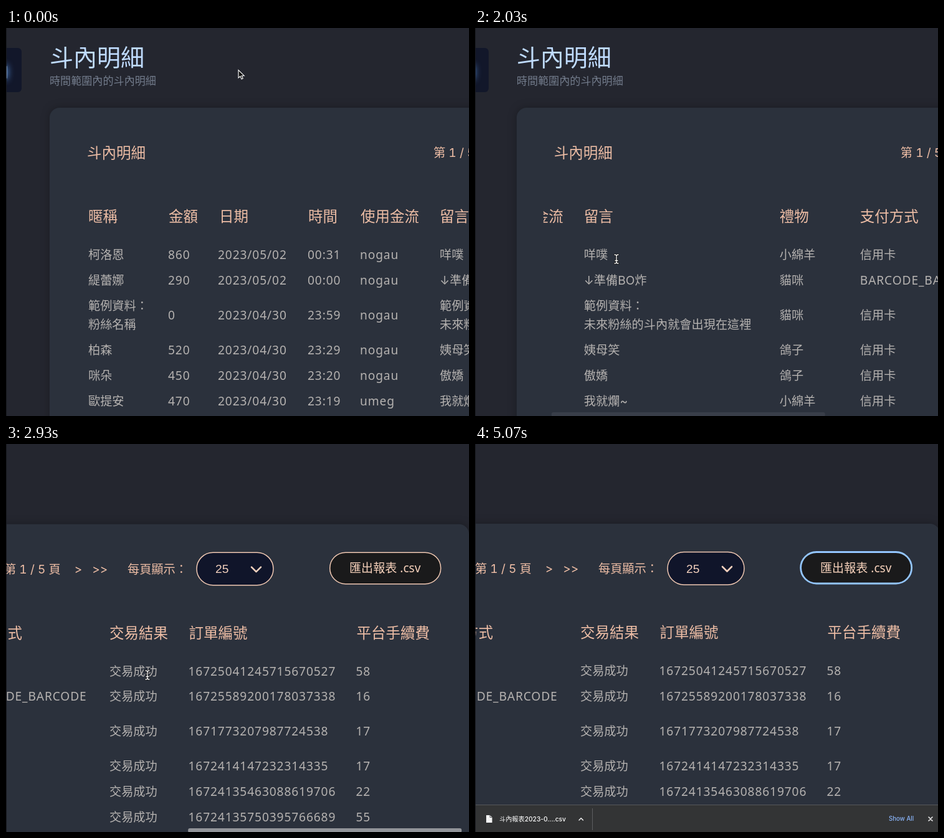
Animation, 743 px wide and 623 px high, one loop 5.23 s. Source, as an HTML page:

```html
<!DOCTYPE html>
<html lang="zh-Hant">
<head>
<meta charset="utf-8">
<title>斗內明細</title>
<style>
  html, body { margin: 0; width: 100%; height: 100%; overflow: hidden; background: #24262f; }
  svg { display: block; width: 743px; height: 623px; }
  text { font-family: Inter, "Noto Sans CJK TC", "Noto Sans CJK", sans-serif; white-space: pre; }
  .peach { fill: #edbda5; font-size: 19.2px; font-variant-numeric: tabular-nums; }
  .head { fill: #edbda5; font-size: 23.5px; }
  .cell { fill: #b5b2b0; font-size: 19.2px; }
  .latin, .label { font-family: "Noto Sans", "Noto Sans CJK TC", "Noto Sans CJK", sans-serif; }
  .latin { letter-spacing: .045em; }
  .label { fill: #f5d0ba; font-size: 19.1px; }
  .card { fill: #2b313c; filter: drop-shadow(0 0 7px #0004); }
  .pill { stroke: #f0c8b2; stroke-width: 1.5; }
  .icon { fill: #bfdbfe; filter: drop-shadow(0 0 6px #60a5fa); }
  .small { fill: #fff; font-size: 10.2px; font-weight: 500; }
  .url { fill: #fff; font-size: 9.6px; font-weight: 500; }
  .line { fill: none; stroke-linecap: round; stroke-linejoin: round; }
</style>
</head>
<body>
<svg viewBox="0 0 743 623">
  <defs>
    <clipPath id="tableClip"><rect x="113" y="270" width="1276" height="400"/></clipPath>
    <clipPath id="urlClip"><rect id="urlBox" y="562" width="247" height="17"/></clipPath>
    <path id="beamShape" d="M-3-7Q0-7 0-5Q0-7 3-7M0-5V5M-3 7Q0 7 0 5Q0 7 3 7M-2 2.5h4"/>
  </defs>
  <rect width="743" height="623" fill="#24262f"/>

  <g id="page">
    <rect x="-10" y="32" width="35" height="71" rx="6" fill="#12172a"/>
    <rect class="icon" x="-8" y="60" width="9.5" height="22" rx="2"/>
    <text x="70" y="61" font-size="38" fill="#bfdbfe">斗內明細</text>
    <text x="70" y="90.5" font-size="17.1" fill="#727b8b">時間範圍內的斗內明細</text>
    <rect class="card" x="70" y="128" width="1362" height="560" rx="16"/>
    <text class="head" x="130" y="208.5">斗內明細</text>
    <g class="peach">
      <text x="686" y="207">第 1 / 5 頁</text>
      <text x="799" y="207">&gt;</text>
      <text x="827.5" y="207">&gt;&gt;</text>
      <text x="884" y="207">每頁顯示：</text>
    </g>
    <rect class="pill" x="995" y="173.5" width="123" height="52.5" rx="26.2" fill="#10152a"/>
    <text x="1025" y="206.5" font-size="19.2" fill="#f2d0bd" style="font-family:'Liberation Sans',Arial,sans-serif">25</text>
    <path class="line" d="M1083 197l7.5 7.5 7.5-7.5" stroke="#f2d0bd" stroke-width="2.6"/>
    <rect id="button" class="pill" x="1208.7" y="173.5" width="178" height="50.5" rx="25.2" fill="#1a1a1b"/>
    <text class="label" x="1240" y="205.5">匯出報表 .csv</text>
    <g clip-path="url(#tableClip)"><g id="table">
      <rect id="selection" x="132" y="348" width="58" height="30" fill="#3c5d88"/>
    </g></g>
  </g>

  <rect id="scrollbar" y="617" width="439" height="7" rx="3" fill="#929499"/>

  <g id="status">
    <rect id="statusBox" x="-4" y="562" height="21" rx="3" fill="#050506"/>
    <g clip-path="url(#urlClip)"><text id="url" class="url" x="4" y="574"></text></g>
  </g>

  <g id="shelf">
    <rect y="579" width="743" height="45" fill="#333435"/>
    <rect y="579" width="743" height="1" fill="#56585b"/>
    <circle id="ring" cx="22.5" cy="602" r="10" fill="none" stroke="#66748c"/>
    <path d="M18 596h6l3.5 3.5v8.5H18z" fill="#f4f4f4"/>
    <path d="M24 596v3.5h3.5" fill="none" stroke="#333435" stroke-width=".8"/>
    <text class="small" x="39" y="606">斗內報表2023-0....csv</text>
    <path class="line" d="M167 604l3.2-3.2 3.2 3.2" stroke="#eee" stroke-width="1.5"/>
    <rect x="188" y="585" width="1" height="35" fill="#5c5e61"/>
    <text class="small" x="664" y="605" style="fill:#8ab4f8;font-size:9.7px">Show All</text>
    <path class="line" d="M728 599l6 6m0-6l-6 6" stroke="#f2f2f2" stroke-width="1.5"/>
  </g>

  <rect width="1" height="623" fill="#15171c"/>

  <g id="cursor">
    <path id="arrow" d="M0 0V12.6L2.9 10 5 14.6 7.2 13.6 5.2 9.2H9.2z" fill="#111" stroke="#fff" stroke-width="1.1"/>
    <g id="beam" class="line">
      <use href="#beamShape" stroke="#111" stroke-width="3.2"/>
      <use href="#beamShape" stroke="#fff" stroke-width="1.3"/>
    </g>
    <path id="hand" d="M-1.4 1Q0-1 1.4 1V5Q3-.2 3.8 5.2Q5.4 4 6 6Q7.6 5.4 7.4 8L6 13.5H-1L-5 8.6Q-4.6 6.6-1.4 9z" fill="#fff" stroke="#111" stroke-width="1"/>
  </g>
</svg>

<script>
const LOOP = 5230;
const $ = id => document.getElementById(id);
const set = (id, attrs) => { for (const k in attrs) $(id).setAttribute(k, attrs[k]); };

function addText(cls, x, y, str) {
  const el = document.createElementNS('http://www.w3.org/2000/svg', 'text');
  el.setAttribute('class', cls);
  el.setAttribute('x', x);
  el.setAttribute('y', y);
  el.textContent = str;
  $('table').append(el);
}

// Table: column position, heading, offset of the cells from the heading
const columns = [
  [132, '暱稱', 0], [261, '金額', -1], [342, '日期', -2], [485, '時間', -1],
  [569, '使用金流', -1], [696, '留言', 0], [1010, '禮物', 0], [1139, '支付方式', 0],
  [1373, '交易結果', 0], [1500.5, '訂單編號', -1], [1769.5, '平台手續費', -1]
];
const rows = [
  [371, '柯洛恩|860|2023/05/02|00:31|nogau|咩噗|小綿羊|信用卡|交易成功|16725041245715670527|58'],
  [411.5, '緹蕾娜|290|2023/05/02|00:00|nogau|↓準備BO炸|貓咪|BARCODE_BARCODE|交易成功|16725589200178037338|16'],
  [467.5, '範例資料：/粉絲名稱|0|2023/04/30|23:59|nogau|範例資料：/未來粉絲的斗內就會出現在這裡|貓咪|信用卡|交易成功|1671773207987724538|17'],
  [523.5, '柏森|520|2023/04/30|23:29|nogau|姨母笑|鴿子|信用卡|交易成功|1672414147232314335|17'],
  [564.5, '咪朵|450|2023/04/30|23:20|nogau|傲嬌|鴿子|信用卡|交易成功|16724135463088619706|22'],
  [605.5, '歐提安|470|2023/04/30|23:19|umeg|我就爛~|小綿羊|信用卡|交易成功|16724135750395766689|55']
];
columns.forEach(([x, name]) => addText('head', x, 311, name));
for (const [y, line] of rows) {
  line.split('|').forEach((str, i) => {
    const x = columns[i][0] + columns[i][2];
    const cls = /^[ -~]+$/.test(str) ? 'cell latin' : 'cell';
    const parts = str.includes('：/') ? str.split('/') : [str];
    parts.forEach((part, j) => addText(cls, x, y + (j - (parts.length - 1) / 2) * 30, part));
  });
}

const address = 'blob:http://localhost:5174/00c943c3-98b1-4104-8';
const ramp = (t, a, b) => Math.min(1, Math.max(0, (t - a) / (b - a)));
const smooth = p => p * p * (3 - 2 * p);
const ease = (t, a, b, skew = 1) => smooth(ramp(t, a, b) ** skew);
const mix = (a, b, p) => a + (b - a) * p;
const show = (id, on) => set(id, { opacity: +on });

function cursorAt(t) {
  if (t < 1000) {
    const p = ease(t, 20, 540);
    return [mix(373, 227, p), mix(67.5, 369.5, p), 'arrow'];
  }
  if (t < 3110) return [227, 371, 'beam'];
  if (t < 4770) {
    const p = ease(t, 3100, 3500);
    return [mix(227, 593.5, p), mix(371, 196, p), p > 0.9 ? 'hand' : 'arrow'];
  }
  const p = ramp(t, 4770, 5050) ** 1.3;
  return [mix(593.5, 617, p), mix(196, -20, p), p < 0.1 ? 'hand' : 'arrow'];
}

function draw(now) {
  const t = now % LOOP;

  // Table scroll, then page scroll with a small bounce at the end
  const tableX = 518 * ease(t, 930, 1800, 0.88);
  const bounce = ease(t, 3000, 3250);
  const pageX = 689 * ease(t, 2000, 2850, 0.974) - 3 * bounce;
  const pageY = 0.7 * (ramp(t, 2030, 2150) - bounce);
  set('table', { transform: `translate(${-tableX} 0)` });
  set('page', { transform: `translate(${-pageX} ${pageY})` });
  show('selection', t >= 570);
  set('scrollbar', { x: 122 + 0.247 * pageX, opacity: ramp(t, 2020, 2100) - ramp(t, 3350, 3600) });

  const focus = t >= 3570;
  $('button').style.cssText = focus ? 'stroke:#93c5fd;stroke-width:2.8' : '';

  // Download shelf and link address
  const lift = 45 * (1 - ease(t, 3690, 3950));
  set('shelf', { transform: `translate(0 ${lift})` });
  show('ring', 1 - ramp(t, 4300, 4600));
  const width = mix(247, 330, ease(t, 4200, 4480));
  set('status', { transform: `translate(0 ${lift})`, opacity: ramp(t, 3660, 3780) - ramp(t, 4830, 5050) });
  set('statusBox', { width: width + 4 });
  set('urlBox', { width });
  $('url').textContent = address + (t < 4200 ? '...' : 'f2e-6b7d0c1a95e3');

  const [x, y, shape] = cursorAt(t);
  set('cursor', { transform: `translate(${x} ${y})` });
  for (const id of ['arrow', 'beam', 'hand']) show(id, id === shape);

  requestAnimationFrame(() => draw(performance.now()));
}
draw(performance.now());
</script>
</body>
</html>
```
